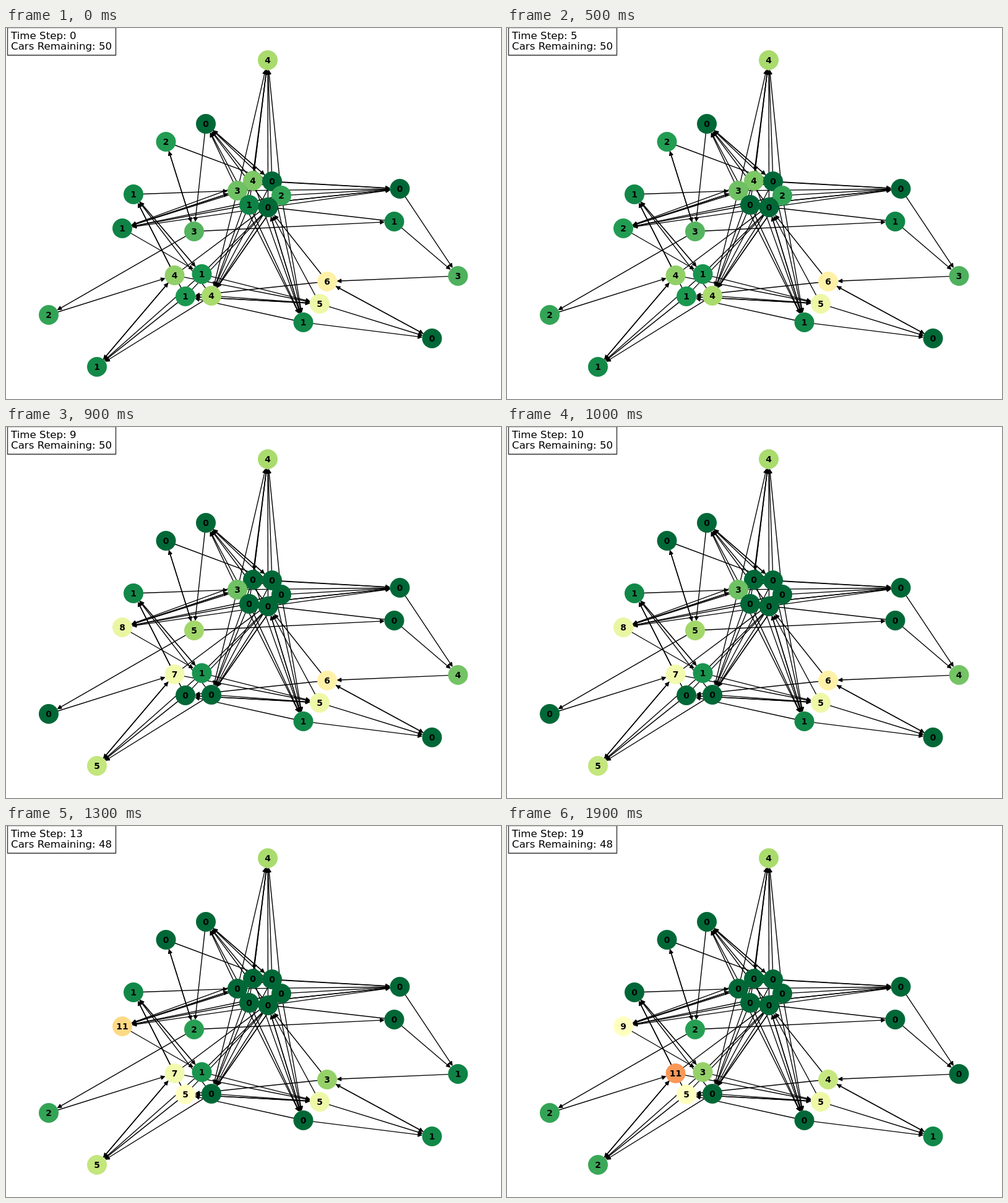
Write an HTML page with a canvas that moves like this. It is 800 by 600 pixels and loops after 2 s.

```html
<!DOCTYPE html>
<html lang="en">
<head>
<meta charset="utf-8">
<title>Traffic network</title>
<style>
html, body { margin: 0; width: 100%; height: 100%; overflow: hidden; background: #fff; }
canvas { display: block; }
</style>
</head>
<body>
<canvas id="stage" width="800" height="600"></canvas>
<script>
const ctx = document.getElementById('stage').getContext('2d');
const STEP_MS = 100, STEPS = 20, RADIUS = 16;

// Junctions: x, y, capacity, cars at the start
const nodes = {
  A: [423, 52, 13, 4], B: [323, 155, 15, 0], C: [258.5, 184, 18, 2],
  D: [206, 269, 15, 1], E: [188, 324, 18, 1], F: [304, 329, 17, 3],
  G: [399, 247, 17, 4], H: [374, 263, 14, 3], I: [430, 248, 15, 0],
  J: [445, 271, 15, 2], K: [393, 286, 17, 1], L: [423.5, 290, 15, 0],
  M: [636.5, 260, 15, 0], N: [627.5, 313, 16, 1], O: [730.5, 401, 18, 3],
  P: [519, 410, 11, 6], Q: [507, 446, 11, 5], R: [480.5, 476, 15, 1],
  S: [688.5, 502, 15, 0], T: [316.5, 398, 11, 1], U: [272.5, 400, 15, 4],
  V: [290, 434, 10, 1], W: [332, 433, 13, 4], X: [69, 464, 15, 2],
  Y: [147, 548, 14, 1]
};

// Every junction of the first group has a road to each of the second
const roads = ['GHIJKL ABEMRW', 'TUVW DJQY', 'PQR LSV', 'DE HT', 'BC FI', 'MN KO',
  'F CNX', 'A G', 'OS P', 'XY U'];

// Cars moved at a step: from, to, number; "-" leaves the network
const moves = {
  5: 'KE1', 9: 'GE4 JE2 CF2 WY4 VY1 XU2 YU1 NO1', 12: 'HE3 OP3 PV5 P-1',
  13: 'FX2 F-1 RS1', 15: 'DT1 TY1', 18: 'YU4 ET2', 19: 'OP1'
};

const ramp = ['006837', '1a9850', '66bd63', 'a6d96a', 'd9ef8b', 'ffffbf',
  'fee08b', 'fdae61', 'f46d43', 'd73027', 'a50026']
  .map(hex => hex.match(/../g).map(part => parseInt(part, 16)));

function loadColor(load) {
  const position = Math.min(load, 1) * 10, i = Math.min(Math.floor(position), 9);
  const mix = ramp[i].map((c, k) => Math.round(c + (ramp[i + 1][k] - c) * (position - i)));
  return `rgb(${mix})`;
}

function countsAt(step) {
  const counts = {};
  for (const id in nodes) counts[id] = nodes[id][3];
  for (const time in moves) {
    if (time > step) continue;
    for (const [from, to, cars] of moves[time].split(' ')) {
      counts[from] -= +cars;
      if (to !== '-') counts[to] += +cars;
    }
  }
  return counts;
}

function drawRoad([x1, y1], [x2, y2]) {
  const length = Math.hypot(x2 - x1, y2 - y1);
  const tip = length - RADIUS - 1, neck = tip - 5.6;
  ctx.save();
  ctx.translate(x1, y1);
  ctx.rotate(Math.atan2(y2 - y1, x2 - x1));
  ctx.beginPath();
  ctx.moveTo(RADIUS - 1, 0);
  ctx.lineTo(tip, 0);
  ctx.stroke();
  ctx.beginPath();
  ctx.moveTo(tip, 0);
  ctx.lineTo(neck, 2.8);
  ctx.lineTo(neck, -2.8);
  ctx.closePath();
  ctx.fill();
  ctx.stroke();
  ctx.restore();
}

function drawRoads() {
  for (const group of roads) {
    const [starts, ends] = group.split(' ');
    for (const from of starts)
      for (const to of ends) drawRoad(nodes[from], nodes[to]);
  }
}

function drawNodes(counts) {
  for (const id in nodes) {
    const [x, y, capacity] = nodes[id];
    ctx.fillStyle = loadColor(counts[id] / capacity);
    ctx.beginPath();
    ctx.arc(x, y, RADIUS, 0, 2 * Math.PI);
    ctx.fill();
  }
  ctx.fillStyle = '#000';
  ctx.font = 'bold 13.89px "DejaVu Sans", sans-serif';
  ctx.textAlign = 'center';
  for (const id in nodes) ctx.fillText(counts[id], nodes[id][0], nodes[id][1] + 4.6);
}

function drawStatus(step, remaining) {
  ctx.fillStyle = '#fff';
  ctx.fillRect(2, 0, 175, 44);
  ctx.strokeStyle = '#333';
  ctx.strokeRect(2.5, -0.5, 175, 44.5);
  ctx.fillStyle = '#000';
  ctx.font = '16.67px "DejaVu Sans", sans-serif';
  ctx.textAlign = 'left';
  ctx.fillText(`Time Step: ${step}`, 8, 18);
  ctx.fillText(`Cars Remaining: ${remaining}`, 8, 35);
}

function draw(step) {
  const counts = countsAt(step);
  const remaining = Object.values(counts).reduce((sum, n) => sum + n, 0);
  ctx.fillStyle = '#fff';
  ctx.fillRect(0, 0, 800, 600);
  ctx.fillStyle = ctx.strokeStyle = '#000';
  ctx.lineWidth = 1.39;
  ctx.lineJoin = 'round';
  drawRoads();
  drawNodes(counts);
  drawStatus(step, remaining);
}

const start = performance.now();
function tick() {
  draw(Math.floor((performance.now() - start) / STEP_MS) % STEPS);
  requestAnimationFrame(tick);
}
tick();
</script>
</body>
</html>
```
